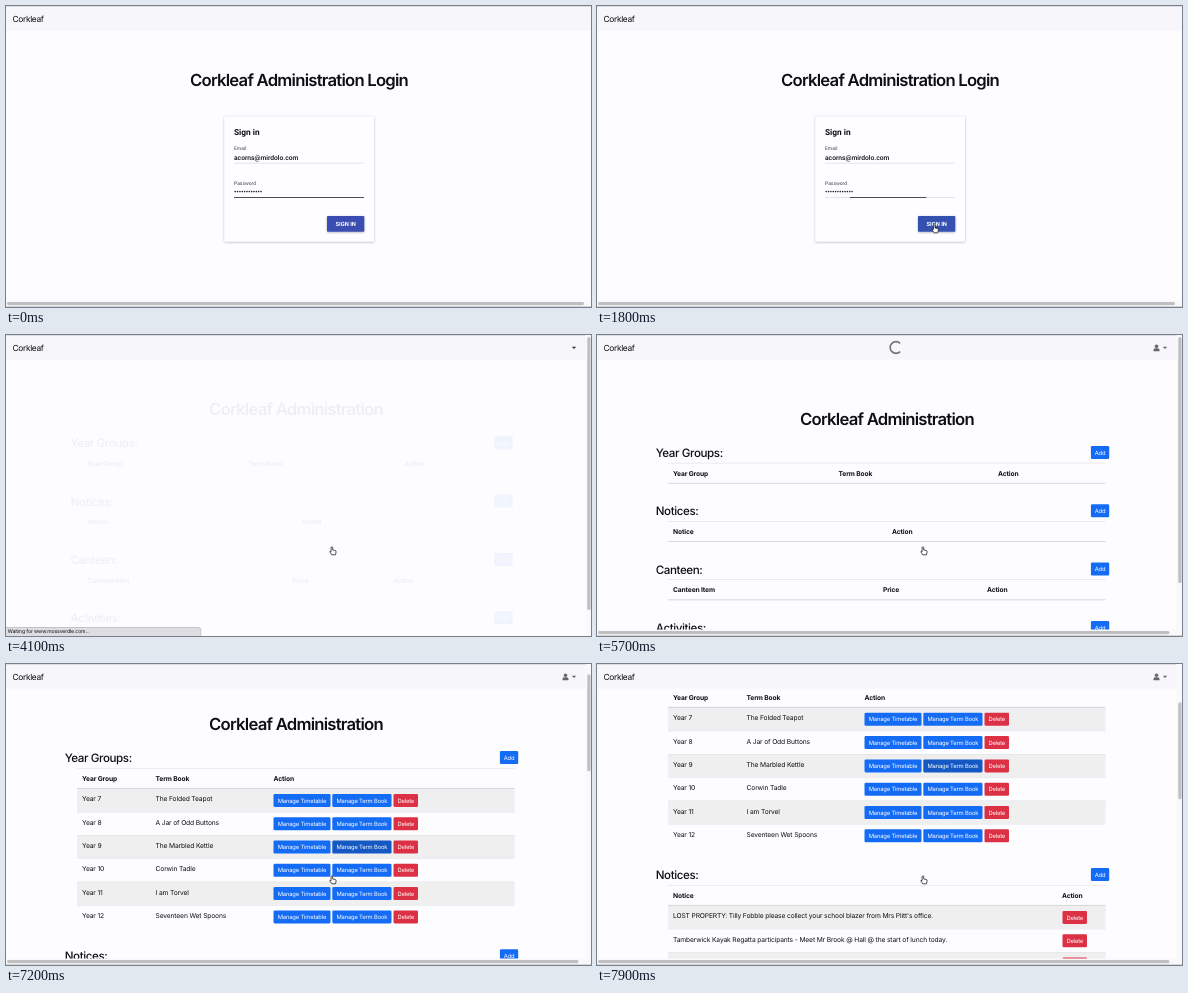
Recreate the animation shown at these times as an HTML page. Size 585 by 301 pixels, loop 8 s.

```html
<!DOCTYPE html>
<html lang="en">
<head>
<meta charset="utf-8">
<title>Administration</title>
<style>
  html, body { margin: 0; width: 100%; height: 100%; overflow: hidden; background: #fdfcff; }
  svg { display: block; width: 585px; height: 301px; }
  text { font: 400 6.7px Inter, sans-serif; letter-spacing: -.02em; fill: #0e0f12; text-rendering: geometricPrecision; white-space: pre; }
  .title { font-size: 16.7px; font-weight: 600; letter-spacing: -.046em; text-anchor: middle; }
  .heading { font-size: 11.6px; font-weight: 500; letter-spacing: -.035em; }
  .brand { font-size: 8.4px; letter-spacing: -.04em; }
  .th { font-weight: 700; }
  .btn { font-size: 5.85px; letter-spacing: -.03em; text-anchor: middle; fill: #fff; }
  .status { font-size: 5.1px; }
  .card { font-family: Roboto, sans-serif; font-weight: 500; letter-spacing: 0; }
  .cardTitle { font-size: 8.3px; font-weight: 600; }
  .label { font-size: 5px; font-weight: 400; fill: #444; }
  .link { font-size: 5.8px; fill: #1a73d8; }
  .signIn { font-size: 5.8px; font-weight: 700; fill: #fff; text-anchor: middle; }
</style>
</head>
<body>
<svg id="stage" viewBox="0 0 585 301">
  <defs>
    <filter id="shadow" x="-10%" y="-10%" width="120%" height="130%">
      <feDropShadow dx="0" dy=".7" stdDeviation=".8" flood-opacity=".3"/>
    </filter>
  </defs>
  <g id="scene"></g>
</svg>
<script>
const LOOP = 8000, STEP = 100;
const BRAND = 'Corkleaf';
const BLUE = '#146cf5', BLUE_HOVER = '#1458c4', RED = '#dc3045', LINE = '#dcdee3';
const ROW = 23.3, SECTION = 58.3, LEFT = 71, RIGHT = 508.5;

// Times of the scene changes
const T = { cursorIn: 700, hover: 1400, blur: 1710, leave: 3400, status: 3500, home: 4100, shown: 4500, styled: 5000, filled: 5900, scroll: 6850 };

const books = ['The Folded Teapot', 'A Jar of Odd Buttons', 'The Marbled Kettle', 'Corwin Tadle', 'I am Torvel', 'Seventeen Wet Spoons'];
const notices = [
  "LOST PROPERTY: Tilly Fobble please collect your school blazer from Mrs Plitt's office.",
  'Tamberwick Kayak Regatta participants - Meet Mr Brook @ Hall @ the start of lunch today.',
  'Library books are due back on Friday.'
];
const emptySections = [
  ['Year Groups:', [['Year Group', 76], ['Term Book', 241.5], ['Action', 401]]],
  ['Notices:', [['Notice', 76], ['Action', 295]]],
  ['Canteen:', [['Canteen Item', 76], ['Price', 286], ['Action', 390]]],
  ['Activities:', []]
];
const filledSections = [
  ['Year Groups:', [['Year Group', 76], ['Term Book', 149.5], ['Action', 267.5]], books, bookRow],
  ['Notices:', [['Notice', 76], ['Action', 465]], notices, noticeRow]
];

const clamp = v => Math.min(1, Math.max(0, v));
const ease = v => { v = clamp(v); return v * v * (3 - 2 * v); };
const mix = (a, b, k) => a + (b - a) * k;

const rect = (x, y, w, h, fill, more = '') => `<rect x="${x}" y="${y}" width="${w}" height="${h}" fill="${fill}" ${more}/>`;
const text = (x, y, s, cls = '') => `<text x="${x}" y="${y}" class="${cls}">${s}</text>`;
const group = (content, attrs) => `<g ${attrs}>${content}</g>`;
const button = (x, y, w, label, fill) =>
  rect(x, y, w, 13, fill, 'rx="1.3"') + text(x + w / 2, y + 8.6, label, 'btn');

function bookRow(title, i, y) {
  return text(76, y + 12.9, `Year ${i + 7}`) + text(149.5, y + 12.9, title) +
    button(267.5, y + 5.4, 57, 'Manage Timetable', BLUE) +
    button(326.3, y + 5.4, 59.2, 'Manage Term Book', i === 2 ? BLUE_HOVER : BLUE) +
    button(387.5, y + 5.4, 24.5, 'Delete', RED);
}

function noticeRow(message, i, y) {
  return text(76, y + 12.9, message) + button(465.5, y + 5.4, 24.5, 'Delete', RED);
}

function section([name, columns, rows = [], drawRow], y, squeeze) {
  const at = x => 290 + (x - 290) * squeeze;
  const left = at(LEFT), width = at(RIGHT) - left;
  let out = text(at(58.7), y + 4.2, name, 'heading') + button(at(512.2) - 18.3, y - 6.8, 18.3, 'Add', BLUE);
  out += rect(left, y + 10, width, .6, LINE);
  out += columns.map(([label, x]) => text(at(x), y + 23, label, 'th')).join('');
  rows.forEach((row, i) => {
    const top = y + 30.6 + i * ROW;
    if (i % 2 === 0) out += rect(left, top, width, ROW, '#efeff0');
    out += rect(left, top, width, .5, LINE) + drawRow(row, i, top);
  });
  return out + rect(left, y + 30, width, .9, '#d3d5da');
}

function navbar() {
  return rect(0, 0, 585, 24.5, '#f7f6fa') + rect(0, 0, 585, 1, '#dfdfe2') + text(6.5, 15.8, BRAND, 'brand');
}

const horizontalBar = width => rect(0, 294.5, 585, 6.5, '#f9f8fa') + rect(1, 296, width, 3.2, '#bfbfc1', 'rx="1.6"') + rect(0, 300, 585, 1, '#d8d4d6');
const verticalBar = (y, h) => rect(579.5, 0, 5.5, 301, '#f9f8fa') + rect(581.3, y, 3.2, h, '#bfbfc1', 'rx="1.6"');

function loginPage(t) {
  const q = ease((t - T.blur) / 200);
  let card = rect(218.3, 110.5, 149.7, 125, '#fefdff', 'rx=".8" filter="url(#shadow)"');
  card += text(228, 129, 'Sign in', 'card cardTitle');
  card += text(228, 144, 'Email', 'card label') + text(228, 154, 'acorns@mirdolo.com', 'card');
  card += rect(228, 156.8, 130, .6, '#d2d2d4');
  card += text(228, 178.8, 'Password', 'card label');
  for (let i = 0; i < 12; i++) card += `<circle cx="${229.2 + i * 2.35}" cy="185.6" r=".8" fill="#222"/>`;
  card += rect(228, 191.2, 130, .6, '#d2d2d4');
  if (q < 1) card += rect(228 + 58.5 * q, 191, mix(130, 4.2, q), 1, '#4a4d5c');
  card += rect(321, 210, 37.3, 15.7, t < T.hover ? '#3b4db0' : '#3551b0', 'rx=".8" filter="url(#shadow)"');
  card += text(339.7, 220, 'SIGN IN', 'card signIn');
  return text(293, 80, BRAND + ' Administration Login', 'title') + card + navbar() + horizontalBar(577);
}

function homePage(t) {
  const styled = t >= T.styled, filled = t >= T.filled;
  const squeeze = styled ? 1 : .975;
  const scroll = 105 * (Math.max(0, t - T.scroll) / 1050) ** 1.348;
  let y = 117.8, body = text(290, 90, BRAND + ' Administration', 'title');
  for (const s of filled ? filledSections : emptySections) {
    body += section(s, y, squeeze);
    y += SECTION + (s[2] || []).length * ROW;
  }
  const opacity = mix(.05, 1, clamp((t - T.home) / (T.shown - T.home)));
  let out = group(body, `transform="translate(0 ${styled ? -scroll : -9.7})" opacity="${opacity}"`) + navbar();
  out += `<path d="M565.8 11.8h4.4l-2.2 2.3z" fill="${styled ? '#666' : '#333'}"/>`;
  if (styled) out += '<circle cx="559.5" cy="11.2" r="1.75" fill="#666"/><path d="M556.5 16.2v-1.1q0-1.8 1.8-1.8h2.4q1.8 0 1.8 1.8v1.1z" fill="#666"/>';
  if (styled && !filled) out += spinner(t);
  out += filled ? verticalBar(2 + scroll * .345, 97) : verticalBar(2, styled ? 246 : 273);
  return out + (styled ? horizontalBar(571.5) : '');
}

function spinner(t) {
  const turn = (t - 5700) / 750 * 360;
  return `<path d="M4.14 4.14A5.85 5.85 0 1 1 4.14 -4.14" fill="none" stroke="#70757c" stroke-width="1.67" transform="translate(299 12.5) rotate(${turn})"/>`;
}

function statusBar() {
  return '<path d="M-1 302V292.5H192.5Q194.8 292.5 194.8 295V302z" fill="#dedee2" stroke="#b4b4b8" stroke-width=".7"/>' +
    text(1.8, 298.3, 'Waiting for www.mossverdle.com...', 'status');
}

function cursor(t) {
  if (t < T.cursorIn) return '';
  const arrive = ease((t - T.cursorIn) / 800), leave = ease((t - T.leave) / 300);
  const x = mix(mix(420, 338.3, arrive), 327, leave), y = mix(mix(306, 223, arrive), 216, leave);
  const hand = 'M-1.9 .6V-3.3Q-1.9 -4.2 -1.1 -4.2T-.3 -3.3V-1L2 -.6Q3.2 -.3 3.1 .8L2.5 3.8H-1.2L-3.2 .9Q-3.2 -.2 -1.9 .6z';
  const arrow = 'M-2 -4V3L-.4 1.6L.8 4.2L1.9 3.7L.8 1.2H3z';
  const shape = t < T.hover ? `d="${arrow}" fill="#111" stroke="#fff" stroke-width=".5"` : `d="${hand}" fill="#fff" stroke="#222" stroke-width=".8"`;
  return `<path ${shape} transform="translate(${x} ${y})"/>`;
}

const scene = document.getElementById('scene');
let shownStep = -1;

function draw(now) {
  const t = Math.floor(now % LOOP / STEP) * STEP;
  if (t !== shownStep) {
    shownStep = t;
    scene.innerHTML = (t < T.home ? loginPage(t) : homePage(t)) +
      (t >= T.status && t < T.styled ? statusBar() : '') + cursor(t);
  }
  requestAnimationFrame(draw);
}
draw(performance.now());
</script>
</body>
</html>
```
